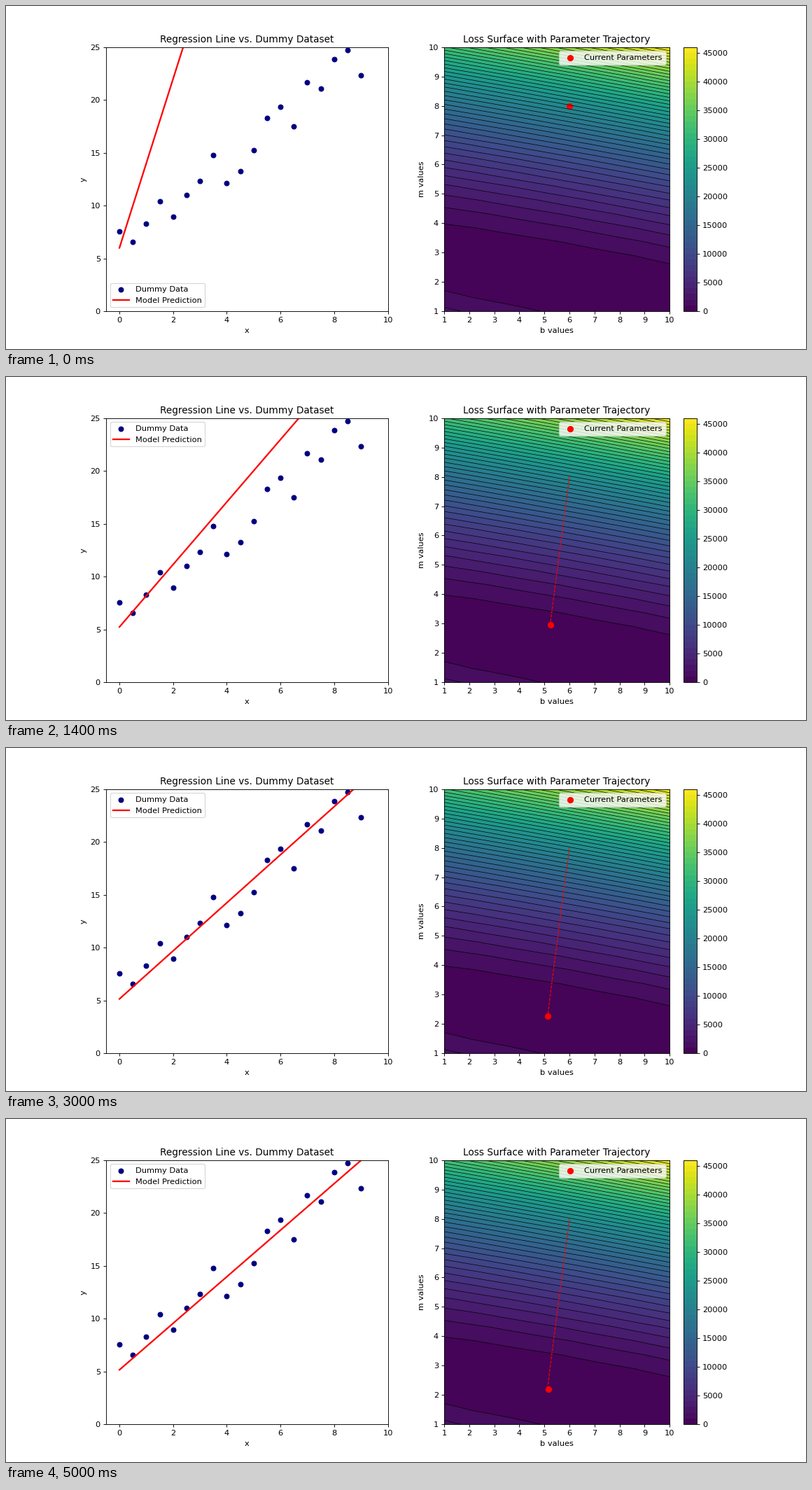
A matplotlib script that plays this animation: 1143 px wide and 490 px high, repeating every 5200 ms.

```python
import numpy as np
import matplotlib.pyplot as plt
from matplotlib.animation import FuncAnimation

DPI = 81.65
STEPS = 26
RATE = 0.004

x = np.arange(0, 10, 0.5)
y = np.array([7.56, 6.59, 8.32, 10.43, 8.92, 11.03, 12.32, 14.77, 12.11, 13.24,
              15.25, 18.28, 19.36, 17.52, 21.69, 21.09, 23.86, 24.71, 22.33, 27.2])


def descend(m, b):
    """Gradient descent on the mean squared error; returns rows of (m, b)."""
    path = [(m, b)]
    for _ in range(STEPS - 1):
        err = m * x + b - y
        m, b = m - RATE * 2 * np.mean(err * x), b - RATE * 2 * np.mean(err)
        path.append((m, b))
    return np.array(path)


path = descend(8.0, 6.0)

# The tiny margin keeps the pixel size from rounding down.
fig, (ax_fit, ax_loss) = plt.subplots(
    1, 2, figsize=(1143.001 / DPI, 490.001 / DPI), dpi=DPI)

# Data and fitted line
ax_fit.scatter(x, y, color="navy", label="Dummy Data")
fit_line, = ax_fit.plot([], [], color="red", lw=2, label="Model Prediction")
ax_fit.set(xlim=(-0.5, 10), ylim=(0, 25), xlabel="x", ylabel="y",
           xticks=range(0, 11, 2), yticks=range(0, 26, 5),
           title="Regression Line vs. Dummy Dataset")
ax_fit.legend(loc="best")

# Loss surface
grid = np.linspace(1, 10, 20)
B, M = np.meshgrid(grid, grid)
loss = ((M[..., None] * x + B[..., None] - y) ** 2).sum(axis=-1)
levels = np.arange(0, 46001, 1000)
surface = ax_loss.contourf(B, M, loss, levels=levels, cmap="viridis")
ax_loss.contour(B, M, loss, levels=levels, colors="black", linewidths=0.6)
fig.colorbar(surface, ax=ax_loss, ticks=range(0, 45001, 5000))

trail, = ax_loss.plot([], [], "r--", lw=1)
dot = ax_loss.scatter([6], [8], color="red", s=50, label="Current Parameters")
ax_loss.set(xlim=(1, 10), ylim=(1, 10), xlabel="b values", ylabel="m values",
            xticks=range(1, 11), yticks=range(1, 11),
            title="Loss Surface with Parameter Trajectory")
ax_loss.legend(loc="upper right")


def update(step):
    m, b = path[step]
    fit_line.set_data(x, m * x + b)
    trail.set_data(path[:step + 1, 1], path[:step + 1, 0])
    dot.set_offsets([[b, m]])
    return fit_line, trail, dot


anim = FuncAnimation(fig, update, frames=STEPS, interval=200,
                     repeat=True, repeat_delay=0, blit=False)
plt.show()
```
